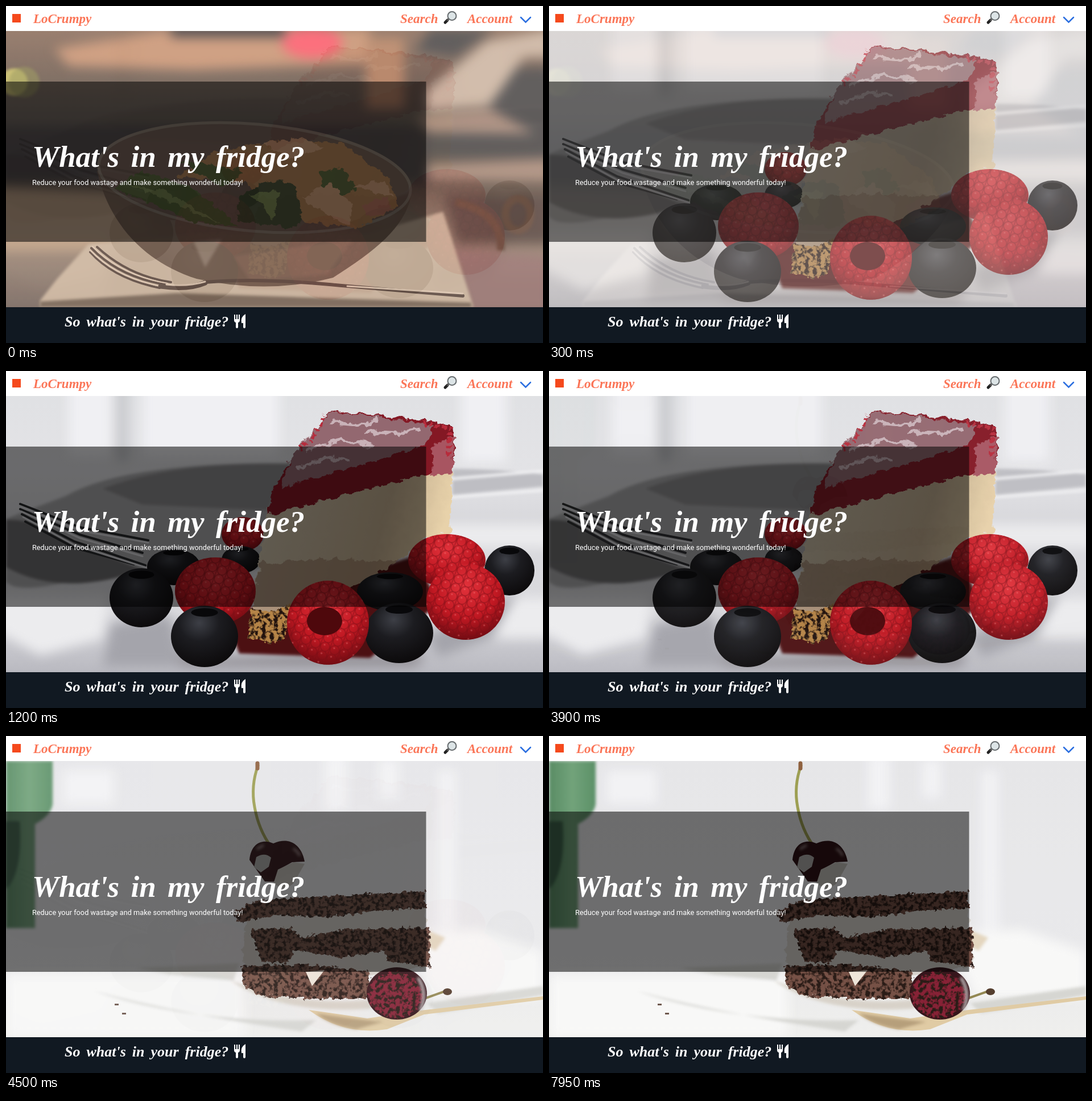
These frames come from a looping animation (944 by 593 pixels, 8 s). An HTML page:

```html
<!DOCTYPE html>
<html lang="en">
<head>
<meta charset="utf-8">
<title>What's in my fridge?</title>
<style>
  html, body { margin: 0; width: 100%; height: 100%; overflow: hidden; background: #fff; }
  svg { display: block; }
  filter { color-interpolation-filters: sRGB; }
  .script { font: italic bold 23px "Liberation Serif", serif; }
  .brand { fill: #fb7557; }
</style>
</head>
<body>
<svg width="944" height="593" viewBox="0 0 944 593">
  <defs>
    <clipPath id="frame"><path d="M0 44H944V530H0Z"/></clipPath>
    <filter id="soft" x="-50%" y="-50%" width="200%" height="200%"><feGaussianBlur stdDeviation="2.5"/></filter>
    <filter id="blur" x="-50%" y="-50%" width="200%" height="200%"><feGaussianBlur stdDeviation="10"/></filter>
    <filter id="rough">
      <feTurbulence type="fractalNoise" baseFrequency=".07" numOctaves="3" seed="2"/>
      <feDisplacementMap in="SourceGraphic" scale="16" xChannelSelector="R" yChannelSelector="G"/>
    </filter>
    <filter id="crumb">
      <feTurbulence type="fractalNoise" baseFrequency=".14" numOctaves="3" seed="4" result="noise"/>
      <feDisplacementMap in="SourceGraphic" in2="noise" scale="12" xChannelSelector="R" yChannelSelector="G" result="cake"/>
      <feColorMatrix in="noise" values="0 0 0 0 .13  0 0 0 0 .07  0 0 0 0 .05  0 0 0 5 -2.2"/>
      <feComposite in2="cake" operator="in" result="holes"/>
      <feMerge><feMergeNode in="cake"/><feMergeNode in="holes"/></feMerge>
    </filter>
    <radialGradient id="blueberry" cx=".42" cy=".28" r=".75">
      <stop stop-color="#3d3f46"/><stop offset=".4" stop-color="#1c1c20"/><stop offset="1" stop-color="#0b090a"/>
    </radialGradient>
    <radialGradient id="raspberry" cx=".5" cy=".3" r=".75">
      <stop stop-color="#e2323b"/><stop offset=".55" stop-color="#c01822"/><stop offset="1" stop-color="#65090f"/>
    </radialGradient>
    <pattern id="drupes" width="18" height="16" patternUnits="userSpaceOnUse" patternTransform="rotate(20)">
      <g fill="none" stroke="#780b14" stroke-opacity=".5" stroke-width="1.5">
        <circle cx="9" cy="8" r="8"/><path d="M0 0v16M18 0v16"/>
      </g>
      <circle cx="7" cy="5" r="1.6" fill="#ff8c8c" fill-opacity=".35"/>
    </pattern>
    <linearGradient id="room" x2="0" y2="1">
      <stop stop-color="#8c6d5a"/><stop offset=".3" stop-color="#5d5148"/><stop offset=".55" stop-color="#645346"/>
      <stop offset=".75" stop-color="#a08672"/><stop offset="1" stop-color="#77655b"/>
    </linearGradient>
    <linearGradient id="linen" x2="0" y2="1">
      <stop stop-color="#e0e1e4"/><stop offset=".28" stop-color="#e3e3e6"/><stop offset=".45" stop-color="#d8d8dc"/>
      <stop offset=".78" stop-color="#dadade"/><stop offset="1" stop-color="#b9b9c0"/>
    </linearGradient>
    <linearGradient id="wall" x2="0" y2="1">
      <stop stop-color="#e5e5e8"/><stop offset=".7" stop-color="#e9e9eb"/><stop offset="1" stop-color="#efefed"/>
    </linearGradient>
    <linearGradient id="cream" x2="1" y2=".2">
      <stop stop-color="#cfc5b0"/><stop offset=".7" stop-color="#c0ab8d"/><stop offset="1" stop-color="#e8d2aa"/>
    </linearGradient>
    <linearGradient id="bottle"><stop stop-color="#52885e"/><stop offset=".5" stop-color="#6c9f75"/><stop offset="1" stop-color="#558c61"/></linearGradient>
  </defs>

  <g clip-path="url(#frame)">
    <g class="slide">
      <path fill="url(#room)" d="M0 44H944V530H0Z"/>
      <g filter="url(#blur)">
        <path fill="#ca9371" d="M85 75L300 40H640V100L330 112 110 105Z"/>
        <path fill="#40393a" d="M-20 210H740V310H-20ZM290 30H490V55H290Z"/>
        <path fill="#bd9c7e" d="M-20 320L200 330 290 430H-20Z"/>
        <path fill="#b88362" d="M633 55H700V180H633Z"/>
        <path fill="#4b4746" d="M745 40H860L790 90 720 80ZM870 110H960V215H820ZM740 210H960V265H740Z"/>
        <path fill="#cdb49f" d="M960 40L845 62 738 150V185L850 175 910 90H960Z"/>
        <path fill="#a98977" d="M720 195L850 180 930 225 740 222ZM740 280L960 268V310L740 305Z"/>
        <path fill="#59453d" d="M770 330H960V420H790Z"/>
        <path fill="#96706a" d="M780 425L960 440V540H810Z"/>
        <ellipse cx="538" cy="65" rx="53" ry="27" fill="#ff5b6a"/>
      </g>
      <circle cx="14" cy="134" r="24" fill="#c6b963" filter="url(#soft)"/>
      <circle cx="32" cy="134" r="27" fill="#94934e" fill-opacity=".55" filter="url(#soft)"/>
      <g fill="none" stroke="#674939" stroke-width="14" filter="url(#soft)">
        <path d="M790 345Q875 365 870 430"/><ellipse cx="900" cy="367" rx="22" ry="28"/>
      </g>
      <path fill="#cbb299" d="M145 419L90 480 60 518V530H822L768 362 640 400H330Z" filter="url(#soft)"/>
      <path fill="#75604f" d="M60 520L300 505 560 514 818 522V530H60Z" filter="url(#soft)"/>
      <path fill="#6b5344" fill-opacity=".92" d="M160 290C180 380 240 450 335 480Q460 508 575 478C650 430 700 390 712 335Z"/>
      <ellipse cx="437" cy="302" rx="275" ry="94" fill="#685246" stroke="#867668" stroke-width="5" transform="rotate(5 437 302)"/>
      <g filter="url(#rough)">
        <path fill="#ae7746" d="M300 300L370 255 480 235 590 240 670 300 690 350 620 390 520 380 420 310Z"/>
        <path fill="#4a5a2a" d="M190 320L240 290 330 320 410 390 330 380ZM300 270L420 290 380 320ZM550 290L590 285 620 325 560 340Z"/>
        <path fill="#374024" d="M405 345Q440 300 500 310 530 350 510 390L410 380Z"/>
        <path fill="#718144" d="M210 310L290 330 380 385 300 350ZM430 330L480 325 470 375Z"/>
        <path fill="#d39a70" d="M520 340L570 310 610 350 600 385ZM450 240L520 232 560 250 500 268ZM610 320L665 306 680 335Z"/>
        <path fill="#b76b54" d="M625 350L670 335 680 360 640 370Z"/>
      </g>
      <g filter="url(#soft)">
        <path fill="#aa9583" fill-opacity=".6" d="M330 415L380 410 350 460Z"/>
        <path fill="#896b57" fill-opacity=".55" d="M400 440L610 410 565 472 430 485Z"/>
      </g>
      <g fill="none" stroke="#5b463b" stroke-width="4" stroke-linecap="round">
        <path d="M150 426Q200 478 285 491M148 433Q190 480 270 496M160 424Q215 475 290 486"/>
        <path stroke="#e0c6ae" stroke-width="2" d="M152 423Q202 474 284 488M148 430Q192 477 270 493"/>
        <path stroke-width="9" d="M272 493Q320 500 350 487"/>
        <path stroke-width="6" d="M350 486Q450 478 590 492L803 510"/>
        <path stroke="#dec5ad" stroke-width="3" d="M282 490Q320 494 350 485M600 493L803 506"/>
      </g>
    </g>

    <g class="slide">
      <path fill="url(#linen)" d="M0 44H944V530H0Z"/>
      <g filter="url(#blur)">
        <path fill="#f0f0f3" d="M110 20H185V150H110ZM240 20H480V150H240ZM800 20H880V160H800Z"/>
        <path fill="#ececee" d="M-20 395H180L170 470 60 500 -20 455ZM740 270H960V310H740ZM890 400H960V470H860Z"/>
        <path fill="#c6c7cb" d="M195 20H214V160H195Z"/>
        <path fill="#a4a4ab" d="M185 445L290 430 310 520H170ZM740 465L900 390 850 470 760 505Z"/>
        <path fill="#8e8b91" d="M300 500L380 505 500 500H740L720 520H310Z"/>
      </g>
      <g filter="url(#soft)">
        <path fill="#a9a9ab" d="M105 220Q210 160 505 162L470 340Q350 380 190 350 20 400 0 370V260Z"/>
        <path fill="#8b8a8c" d="M170 207Q300 158 500 164L460 245 240 235Z"/>
        <path fill="#6d6c6e" d="M0 262Q60 260 115 300L240 350Q100 400 0 345Z"/>
        <path fill="#bebec3" d="M785 172Q860 172 944 182V203L785 218Z"/>
        <path fill="none" stroke="#f0f0f2" stroke-width="5" d="M780 190L944 176M780 222L944 210"/>
      </g>
      <g fill="none" stroke-linecap="round">
        <path stroke="#292a2d" stroke-width="4" d="M25 234L130 275 250 298M25 243L130 288 240 320M28 252L120 300 245 342M34 265L120 311 225 340"/>
        <path stroke="#d8d8dc" stroke-width="3" d="M25 238L130 281 250 302M27 247L130 294 240 326M30 257L120 306 250 347"/>
      </g>
      <path fill="#4c1012" d="M385 430L720 325 760 410 640 505 410 497Z" filter="url(#soft)"/>
      <g id="backBerries"></g>
      <g filter="url(#rough)">
        <path fill="url(#cream)" d="M460 240L738 178 785 165 781 285 738 295 700 328 640 366 515 412 432 432 443 340Z"/>
        <path fill="#8b6a55" fill-opacity=".5" d="M445 340L570 330 690 335 640 366 520 412 432 430Z"/>
        <path fill="#841824" d="M470 207L520 128 572 70 740 87 784 95 790 132 783 176 738 182 610 214 458 253Z"/>
        <path fill="#936870" d="M508 140L572 72 660 82 755 96 737 130 640 160 482 207Z"/>
        <path fill="#a85561" d="M750 130L788 115 784 180 745 185Z"/>
        <path fill="none" stroke="#c9b2b8" stroke-width="6" stroke-linecap="round" d="M575 90L620 94 650 88M530 140L590 120 640 130M510 170L560 154 600 156M630 107L690 109 725 102"/>
        <path fill="none" stroke="#b72c3c" stroke-width="8" stroke-dasharray="5 6" d="M515 137Q545 118 560 75M735 92L782 101 779 150"/>
      </g>
      <path fill="#b58447" d="M430 417L465 425 502 410 490 470 465 480 426 470Z" filter="url(#crumb)"/>
      <g id="frontBerries"></g>
    </g>

    <g class="slide">
      <path fill="url(#wall)" d="M0 44H944V530H0Z"/>
      <g filter="url(#blur)">
        <path fill="#f2f2f4" d="M560 30H600V130H560ZM655 40H690V110H655ZM760 60H790V400H760ZM100 60H190V120H100Z"/>
        <path fill="#f8f8f7" d="M0 420H420V530H0ZM700 350L830 340 944 380V460H750Z"/>
      </g>
      <path fill="url(#bottle)" d="M0 44H82V120Q79 140 51 155V338H0Z" filter="url(#soft)"/>
      <path fill="#355c43" d="M0 150H24Q30 240 0 270Z" filter="url(#soft)"/>
      <g filter="url(#soft)">
        <path fill="#d5d5d1" d="M155 449Q320 505 545 500L520 520Q310 490 155 449ZM230 408L410 400 400 430 290 420ZM740 470L944 440V456L760 488Z"/>
        <path fill="#d7d1c7" d="M395 430Q520 480 660 462L640 480Q480 490 395 430Z"/>
        <path fill="#e3d5bd" d="M742 342L772 355 755 378 740 370Z"/>
      </g>
      <path fill="#d6d2cb" d="M425 300L735 285 745 405 640 420 415 408Z" filter="url(#rough)"/>
      <g fill="#704a3e" filter="url(#crumb)">
        <path d="M398 310L440 290 520 284 737 273V302L650 308 560 319 470 315 410 328Z"/>
        <path d="M430 341L500 337 520 354 600 340 744 337 746 407 668 394V378L590 390 507 376 496 400 448 396Z"/>
        <path d="M414 405L520 401 640 414 636 461 540 463 450 457 418 440Z"/>
      </g>
      <path fill="#eee5d9" d="M527 415L560 412 538 440Z"/>
      <path fill="none" stroke="#999b4c" stroke-width="5" stroke-linecap="round" d="M443 52Q430 88 437 125 444 165 466 195"/>
      <path stroke="#8b5a37" stroke-width="7" stroke-linecap="round" d="M442 48V57"/>
      <path fill="#25080b" d="M428 218C431 186 453 181 470 189 500 176 520 193 525 221L503 222 480 235 488 257 455 256Z"/>
      <path fill="#aaa8a5" d="M440 213Q455 204 466 214L462 230 448 240 436 231Z"/>
      <path fill="#bfbbb5" d="M478 235L505 222 525 225 505 260 490 270 470 260Z"/>
      <path fill="none" stroke="#b8a5a6" stroke-width="4" opacity=".7" d="M441 199L453 192M505 198Q514 204 516 211" filter="url(#soft)"/>
      <path fill="#dfc9a0" d="M532 482Q590 490 635 497L720 484 944 458V464L735 490 670 516Q595 528 532 482Z"/>
      <path fill="#b39b76" d="M545 488Q600 497 663 503L615 516Q570 509 545 488Z" filter="url(#soft)"/>
      <path fill="none" stroke="#8f834c" stroke-width="4" d="M730 464L772 449"/>
      <ellipse cx="776" cy="450" rx="8" ry="6" fill="#4d3625"/>
      <ellipse cx="687" cy="453" rx="53" ry="46" fill="#2e0b11"/>
      <ellipse cx="684" cy="455" rx="47" ry="40" fill="#82192d" filter="url(#crumb)"/>
      <path fill="none" stroke="#c2bcbd" stroke-width="5" d="M724 425Q742 452 728 483" filter="url(#soft)"/>
      <path fill="#685146" d="M191 471h7v3h-7ZM204 487h7v3h-7Z"/>
    </g>
  </g>

  <path fill-opacity=".53" d="M0 133H738.5V415H0Z"/>
  <path fill="#111922" d="M0 530H944V593H0Z"/>

  <path fill="#f5491c" d="M11 14H26V29H11Z"/>
  <g class="script brand">
    <text x="48" y="30">LoCrumpy</text>
    <text x="693" y="30">Search</text>
    <text x="811" y="30">Account</text>
  </g>
  <g fill="none" stroke-linecap="round">
    <path stroke="#222" stroke-width="5" d="M772 29L776 25"/>
    <path stroke="#555" stroke-width="3" d="M776 25L779 22"/>
    <circle cx="784" cy="17.5" r="7.5" fill="#dce4e6" stroke="#666b6e" stroke-width="2"/>
    <path stroke="#2c6fe0" stroke-width="2.5" d="M905 20L913.5 28.5 922 20"/>
  </g>
  <g fill="#fff">
    <text class="script" x="46" y="283" style="font-size:53px;word-spacing:7px">What's in my fridge?</text>
    <text x="46" y="315" font-family="Roboto, sans-serif" font-size="12.75">Reduce your food wastage and make something wonderful today!</text>
    <text class="script" x="103" y="564" style="font-size:26px;word-spacing:4.5px">So what's in your fridge?</text>
    <path d="M401 543h2v8h2v-8h2v8h2v-8h2v10q0 3-3 4v8q0 2-2 2t-2-2v-8q-3-1-3-4ZM421 542V565q0 2-2 2t-2-2v-7h-3q-2-11 7-16Z"/>
  </g>
</svg>
<script>
const ellipse = (x, y, rx, ry, fill) => `<ellipse cx="${x}" cy="${y}" rx="${rx}" ry="${ry}" fill="${fill}"/>`;
const raspberry = (...box) => ellipse(...box, 'url(#raspberry)') + ellipse(...box, 'url(#drupes)');
const blueberry = (x, y, rx, ry) => ellipse(x, y, rx, ry, 'url(#blueberry)') +
  ellipse(x, y - ry * .78, rx * .4, ry * .14, '#08080a');

document.getElementById('backBerries').innerHTML =
  raspberry(416, 287, 37, 30) + blueberry(413, 332, 34, 24) + blueberry(295, 345, 47, 32) +
  blueberry(885, 351, 44, 44);
document.getElementById('frontBerries').innerHTML =
  blueberry(238, 399, 56, 52) + raspberry(368, 387, 71, 59) + blueberry(349, 467, 59, 54) +
  blueberry(675, 388, 58, 34) + raspberry(775, 333, 68, 46) + raspberry(808, 406, 69, 67) +
  blueberry(691, 461, 60, 53) + raspberry(566, 443, 72, 74) + ellipse(560, 440, 31, 25, '#4e080c');

const LOOP = 8000, STEP = 150, FADE = 1100;
const fadeStarts = [-95, 3860, 7885];
const slides = document.querySelectorAll('.slide');

// CSS "ease": cubic-bezier(.25, .1, .25, 1)
function ease(p) {
  if (p <= 0 || p >= 1) return p <= 0 ? 0 : 1;
  let low = 0, high = 1, s;
  for (let i = 0; i < 20; i++) {
    s = (low + high) / 2;
    if (.75 * s * (1 - s) + s ** 3 < p) low = s; else high = s;
  }
  return .3 * s * (1 - s) ** 2 + 3 * s * s * (1 - s) + s ** 3;
}

function draw() {
  const t = Math.floor(performance.now() % LOOP / STEP) * STEP;
  const fades = fadeStarts.map(start => ease((t - start) / FADE));
  slides.forEach((slide, i) => {
    const opacity = (i ? fades[i - 1] : 1) * (1 - fades[i]);
    slide.setAttribute('opacity', opacity.toFixed(3));
    slide.setAttribute('visibility', opacity > .001 ? 'visible' : 'hidden');
  });
  requestAnimationFrame(draw);
}
draw();
</script>
</body>
</html>
```
